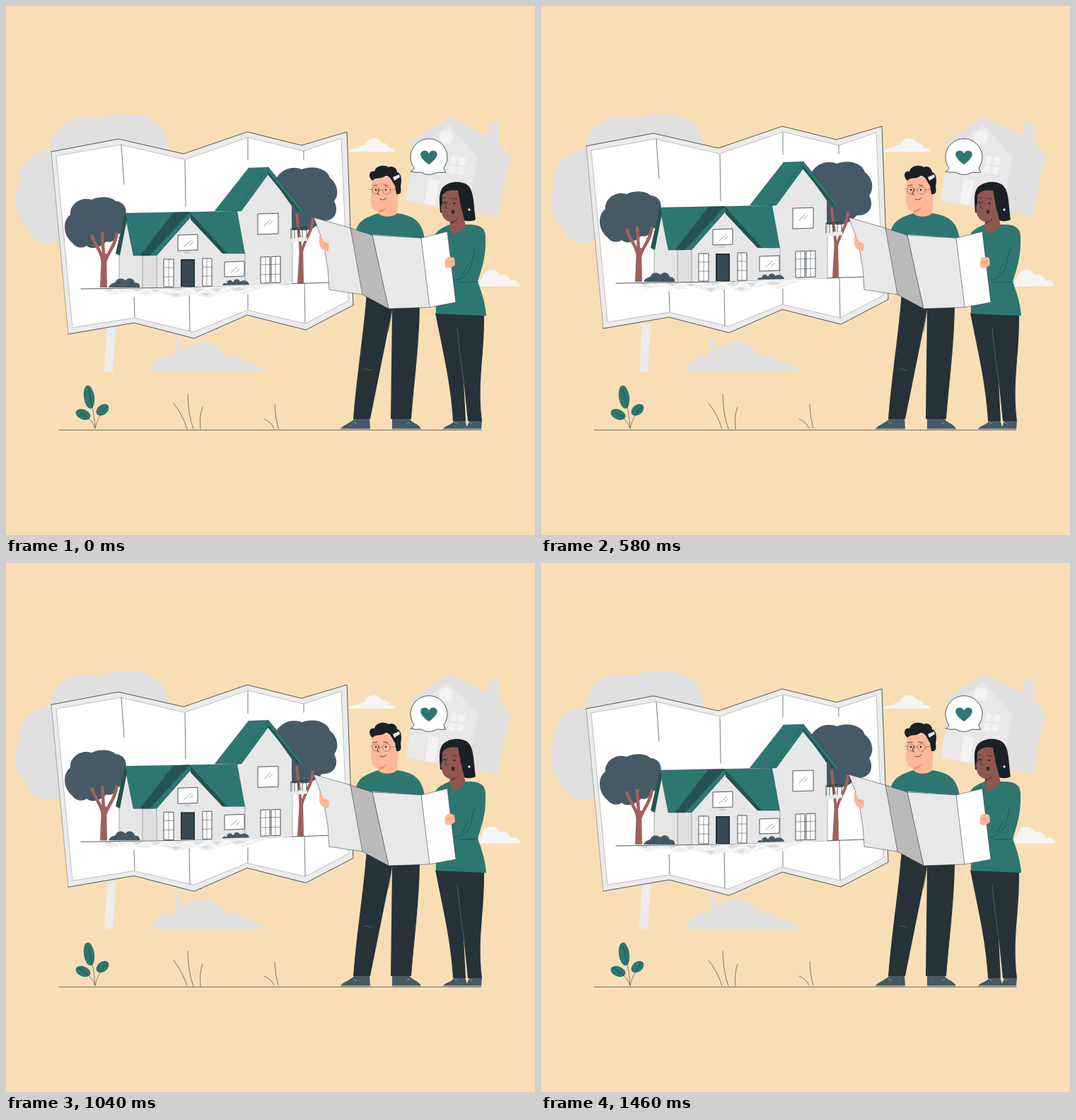
These frames come from a looping animation (748 by 748 pixels, 1.5 s). An HTML page:

```html
<!DOCTYPE html>
<html lang="en">
<head>
<meta charset="utf-8">
<title>House plan</title>
<style>
html, body { margin: 0; width: 100%; height: 100%; overflow: hidden; background: #f9deb5; }
svg { display: block; width: 100vw; height: 100vh; }
.line { fill: none; stroke: #263238; stroke-width: .8; stroke-linecap: round; stroke-linejoin: round; }
.pale { fill: #e0e0e0; }
.light { fill: #ebebeb; }
.cloud { fill: #f5f5f5; }
.green { fill: #2e7771; }
.deep { fill: #245450; }
.slate { fill: #465966; }
.navy { fill: #263238; }
.trunk { fill: none; stroke: #a0615c; stroke-linejoin: round; }
.skin { fill: #ffb797; }
.brown { fill: #8f5750; }
.hair { fill: #1b2024; }
.pane { fill: #fff; stroke: #263238; stroke-width: .8; }
</style>
</head>
<body>
<svg viewBox="0 0 748 748">
  <g id="backdrop">
    <path class="pale" d="M75 331C58 339 36 334 29 311C12 302 10 270 18 250C16 225 38 202 63 203C62 179 83 157 110 158C119 154 129 160 136 158C156 150 188 150 205 160C223 167 230 186 229 205L200 300Z"/>
    <path class="light" d="M143 450H155L151 517H139Z"/>
    <path class="pale" d="M241 468C248 473 249 481 243 487C237 482 237 474 241 468Z"/>
    <path class="pale" d="M206 517C207 506 211 503 216 501C219 494 228 494 234 498C238 486 246 484 252 486C260 471 294 470 303 488C308 489 310 493 310 497C320 491 334 494 338 506C346 502 353 505 355 510C361 509 364 513 365 517Z"/>
    <path fill="none" stroke="#f3e2c8" d="M417 480V510M431 485V510M55 485V500"/>
    <path class="cloud" d="M484 206C486 200 494 203 498 200C503 196 506 198 508 195C513 184 527 185 532 194C539 193 541 198 542 201C547 200 550 202 551 206Z"/>
    <path class="cloud" d="M665 397C666 390 671 389 673 385C675 371 693 369 699 381C707 378 712 383 713 389C720 386 726 390 727 396Z"/>
    <path class="pale" d="M571 193L627 157L681 183L684 163L698 166L695 190L715 216L710 221L695 298L565 275L578 202Z"/>
    <path fill="#e8e8e8" d="M578 203L628 166L667 213L652 292L565 275Z"/>
    <path class="pale" d="M571 193L627 157L677 213L664 211L626 168L580 201Z"/>
    <g fill="#f3f3f3">
      <circle cx="622" cy="186" r="9.5"/>
      <path d="M630 211L638 213L636 224L628 222ZM641 213L650 215L648 226L639 224ZM627 225L636 227L634 237L625 235ZM639 227L648 229L646 239L637 237ZM598 244L613 247L606 282L592 279Z"/>
    </g>
  </g>

  <g id="plan">
    <path class="light" d="M64 206L159 188L251 209L341 178L418 197L482 178L491 423L424 458L341 437L266 470L181 448L88 464Z"/>
    <path fill="#fff" stroke="#9a9a9a" stroke-width=".6" d="M71 212L162 196L253 217L342 186L421 205L474 187L484 417L423 449L341 430L265 461L181 441L94 455Z"/>
    <path class="line" d="M64 206L159 188L251 209L341 178L418 197L482 178L491 423L424 458L341 437L266 470L181 448L88 464"/>
    <path class="line" stroke-opacity=".45" d="M64 206L88 464"/>
    <path class="line" stroke-opacity=".8" d="M163 196L167 252M253 218L254 283M342 187V218M421 205V217M181 412L182 440M259 406L260 460M342 408V429M422 392L423 448"/>

    <path fill="#f0f0f0" d="M133 400L370 396L354 401L335 408L318 403L300 408L286 413L265 408L240 413L219 406L196 409L176 404L148 408Z"/>
    <path fill="#dcdcdc" d="M140 400L152 399L148 404ZM176 400L194 400L186 404ZM205 400L220 402L212 405ZM237 400L254 400L247 404ZM263 399L281 400L270 404ZM290 400L305 399L299 404ZM316 400L330 398L344 402L325 402ZM232 406L247 407L240 412ZM276 406L288 406L284 411Z"/>
    <path fill="none" stroke="#fff" stroke-width="1.5" d="M154 399L163 408L174 399L184 406L200 399L208 407L226 400L235 406L258 400L270 408L286 399L297 408L313 399L326 406L350 398"/>

    <g id="left-tree">
      <path class="slate" d="M94 335C81 325 79 304 91 295C90 280 106 269 121 274C135 267 151 271 155 276C170 277 172 292 168 299C173 310 168 321 158 323C154 333 147 335 142 333C131 344 119 344 114 339C106 344 98 341 94 335Z"/>
      <path class="trunk" stroke-width="4.500" d="M137 362C135 345 125 339 121 323M138 352L136 320M140 362C144 348 155 339 157 320"/>
      <path fill="#a0615c" d="M133 398L135 350H142L143 398Z"/>
    </g>
    <g id="right-tree">
      <path class="slate" d="M381 246C389 229 407 226 418 231C436 224 455 231 458 243C470 252 471 268 464 276C472 291 464 305 447 304C437 313 431 318 418 317H400Z"/>
      <path class="trunk" stroke-width="4" d="M417 352C416 330 413 315 411 293M417 352C420 332 434 320 434 299"/>
      <path fill="#a0615c" d="M412 392L415 340H420L421 392Z"/>
    </g>

    <path class="line" d="M106 400L245 398L456 391"/>
    <g id="house">
      <path fill="#e6e6e6" d="M168 298L160 352V398H194V352Z"/>
      <path fill="#e0e0e0" d="M193 351H214V398H193Z"/>
      <path fill="#e7e7e7" d="M261 300L213 352V398L338 396V345H306Z"/>
      <path fill="#e7e7e7" d="M370 235L326 290L337 345L338 396L405 393L404 283Z"/>
      <path class="line" stroke-opacity=".45" d="M160 353V398M193 353V398M213 353V398M338 350V395M405 290V393"/>
      <path class="green" d="M168 293L327 290L338 350H309L261 299L213 353H180Z"/>
      <path class="deep" d="M168 293L155 350L161 353L171 302ZM237 292L260 291L208 353H190ZM260 292L313 350H306L261 302Z"/>
      <path class="green" d="M258 293L261 298L213 353H203Z"/>
      <path class="green" d="M343 229L371 228V238L333 290H295Z"/>
      <path class="deep" d="M371 228L421 290H412L370 238Z"/>
      <path class="green" d="M371 228L421 290L416 290L369 232Z"/>
      <path class="line" stroke-opacity=".4" d="M168 293L331 290M237 292L190 352M260 292L203 353H180L168 293M260 292L309 350H338M343 229L295 290M343 229L371 228L421 290M371 228L326 290"/>
      <g class="pane">
        <path d="M243 324L271 323V345L243 346ZM309 362L337 361V382L309 383ZM356 294L385 293V322L356 323Z"/>
        <path d="M223 358H237V397H223ZM278 357H291V396H278ZM360 355L373 354.500V391.500L360 392ZM375 354.500L388 354V391L375 391.500Z"/>
      </g>
      <path class="navy" d="M247 358H267V397H247Z"/>
      <path fill="#394953" d="M249 360H265V396H249Z"/>
      <path class="line" stroke-opacity=".6" d="M230 358V397M223 370H237M223 383H237M284 357V396M278 369H291M278 382H291M367 355V392M381 354V391M360 366L388 365M360 380L388 379M252 340L262 331M260 338L264 334M318 377L327 369M326 376L330 372M365 311L374 302M372 309L377 304"/>
      <path fill="#d0d0d0" d="M252 347H261V350H252Z"/>
      <path class="light" d="M402 328L426 326V332L402 334Z"/>
      <path class="line" d="M403 315L425 313V327M403 315V329M408 315V328M413 314V328M419 314V327"/>
      <path class="slate" d="M145 398C148 391 152 393 155 390C158 383 166 385 169 388C174 382 181 386 182 391C188 391 190 395 189 398ZM306 395C307 391 311 392 313 393C313 385 319 388 321 391C324 384 330 386 331 390C337 386 343 389 344 394Z"/>
      <path class="line" stroke-opacity=".7" d="M154 398C155 392 159 390 162 394M172 397C173 391 178 390 180 395M314 394L312 389M322 394L318 388M329 394L333 389"/>
    </g>
  </g>

  <g id="bubble">
    <path fill="#fff" stroke="#263238" stroke-width=".8" d="M572 234Q576 232 577 229A26 26 0 1 1 619 229Q620 233 622 235Q615 236 610 235Q598 242 586 235Q579 236 572 234Z"/>
    <path class="green" d="M598 224C583 214 584 205 592 204.500Q596 204.500 598 208.500Q600 204.500 604 204.500C612 205 613 214 598 224Z"/>
  </g>

  <g id="ground">
    <path class="line" stroke-opacity=".8" d="M75 599.500H672"/>
    <g class="green">
      <ellipse cx="117.500" cy="553" rx="7.500" ry="16.500" transform="rotate(-8 117.500 553)"/>
      <ellipse cx="136.500" cy="571" rx="10" ry="7" transform="rotate(-38 136.500 571)"/>
      <ellipse cx="109" cy="577.500" rx="11" ry="7" transform="rotate(22 109 577.500)"/>
    </g>
    <path class="line" stroke-opacity=".7" d="M126 597Q125 575 116 541M126 597Q130 579 143 566M126 597Q121 582 101 572"/>
    <path class="line" stroke-opacity=".75" d="M237 562Q249 576 256 598M257 549Q258 581 265 598M278 567Q273 580 275 598M365 584Q375 588 379 597M380 564Q381 584 385 597"/>
  </g>

  <g id="man">
    <path class="slate" d="M473 598C477 592 487 590 493 583H514L515 598ZM546 583H570C574 590 583 590 587 598H546Z"/>
    <path stroke="#8fa0a8" d="M473 598H515M546 598H587M491 588L496 591M571 588L567 591"/>
    <path class="navy" d="M510 405H585C586 470 577 530 573 584H544L546 430L515 584H491C496 520 505 470 510 405Z"/>
    <path class="line" style="stroke:#596b74" d="M546 430L541 460M507 513L517 515"/>
    <path class="green" d="M494 328C494 309 500 301 527 293H553C580 297 588 307 592 329L585 412H510Z"/>
    <path class="skin" d="M517 246L516 277C517 286 521 290 527 290V294C533 299 548 299 553 293L555 262L551 240Z"/>
    <path d="M527 289Q535 288 539 283Q537 290 527 293Z" fill="#ef8f73"/>
    <path class="hair" d="M518 247C511 241 514 232 521 234C523 225 536 224 541 228C547 225 553 230 553 235C559 236 560 246 558 255C559 262 559 267 552 266L550 254C546 249 544 240 537 240C530 246 524 241 518 247Z"/>
    <path fill="#e8e8e8" d="M547 242L556 238L557 242L549 247Z"/>
    <g class="line">
      <g stroke-opacity=".45"><circle cx="523" cy="261" r="5"/><circle cx="538" cy="261" r="5.500"/><path d="M528 260H532M544 260L555 259M514 259H518"/></g>
      <path d="M527 258L525 266L528 267M529 273Q534 276 538 271M519 254L525 253M534 253L540 254"/>
    </g>
    <circle class="hair" cx="523" cy="260" r="1.200"/><circle class="hair" cx="537" cy="260" r="1.200"/>
  </g>

  <g id="woman">
    <path class="slate" d="M618 598C621 593 630 593 634 586H649L652 595L655 586H673L672 598Z"/>
    <path stroke="#8fa0a8" d="M618 598H672M634 588L638 591M654 588L659 591"/>
    <path class="navy" d="M607 434H676C677 494 666 530 673 587H653L647 528L650 587H632C629 535 618 490 607 434Z"/>
    <path class="line" style="stroke:#596b74" d="M638 455Q642 495 647 529"/>
    <path class="green" d="M606 325C610 316 618 313 627 309H654C670 309 679 314 678 328C679 358 671 375 667 390C672 403 678 420 679 438L608 435Z"/>
    <path class="line" stroke-opacity=".65" d="M631 388Q646 389 656 373L663 344M668 390L640 391M645 381Q651 370 654 365"/>
    <path class="hair" d="M614 292C613 279 611 264 618 256C627 247 643 247 651 252C662 259 661 279 664 302C655 307 640 303 638 295Z"/>
    <path class="brown" d="M617 268C621 260 633 260 639 261C640 267 642 275 643 283L648 302L650 311Q641 320 632 323L627 310L628 305C621 304 617 298 616 292L615 285L617 279Z"/>
    <path d="M628 305Q637 304 640 297Q637 307 628 308Z" fill="#6d3e3a"/>
    <path class="line" d="M624 276L621 285L625 286M618 272L622 271M631 272L638 273"/>
    <circle class="hair" cx="620" cy="278" r="1.300"/><circle class="hair" cx="634" cy="279" r="1.300"/>
    <ellipse cx="632" cy="291" rx="2.500" ry="3" fill="#4b2522"/>
    <circle cx="655" cy="288" r="1.700" fill="#e8e8e8"/>
  </g>

  <g id="leaflet">
    <path fill="#e8e8e8" d="M435 299L487 314L504 408L457 401Q456 345 435 299Z"/>
    <path fill="#bababa" d="M487 314L518 324L541 428L504 408Z"/>
    <path fill="#e8e8e8" d="M518 323L587 328L599 426L541 428Z"/>
    <path fill="#fff" d="M587 328L624 319L636 419L599 426Z"/>
    <path class="line" stroke-opacity=".65" d="M435 299L487 314L518 324L587 328L624 319L636 419L599 426L541 428L504 408L457 401Q456 345 435 299M487 314L504 408M518 324L541 428M587 328L599 426"/>
    <path class="skin" d="M443 324C446 326 448 330 449 333L456 335Q458 340 455 347C449 347 443 341 443 335Z"/>
    <path class="skin" d="M622 357C625 354 631 354 634 357L635 366C630 371 624 372 621 369Q620 362 622 357Z"/>
    <path class="line" style="stroke:#ef8f73" d="M449 336L454 338M623 362L632 361"/>
  </g>
</svg>
<script>
const LOOP = 1500, FPS = 24, HALF = 17.5, LIFT = 10;
const plan = document.getElementById('plan');
const start = performance.now();

// The plan rises and sinks at constant speed, in film-rate steps.
function draw() {
  const time = (performance.now() - start) % LOOP;
  const step = Math.min(35, Math.floor(time / 1000 * FPS + 0.1));
  const rise = LIFT * (1 - Math.abs(step - HALF) / HALF);
  plan.setAttribute('transform', `translate(0 ${-rise})`);
  requestAnimationFrame(draw);
}
draw();
</script>
</body>
</html>
```
